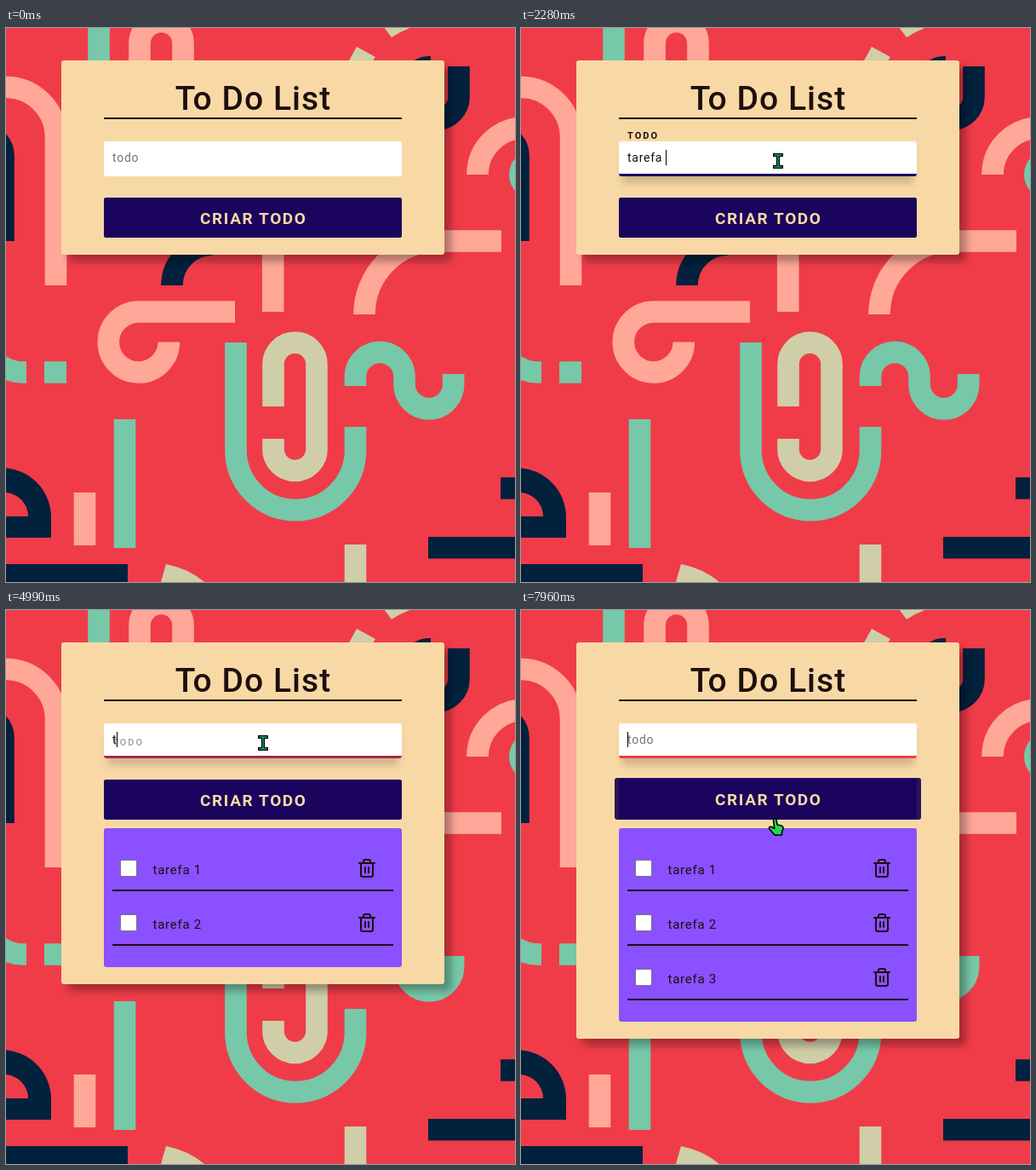
Animation of 598x650 px, one loop 8000 ms. Source, as an HTML page:

```html
<!DOCTYPE html>
<html lang="pt">
<head>
<meta charset="utf-8">
<title>To Do List</title>
<style>
  html, body { margin: 0; width: 100%; height: 100%; overflow: hidden; background: #f03c48; }
  svg { display: block; width: 598px; height: 650px; }
  text { font-family: Roboto, "Open Sans", sans-serif; white-space: pre; fill: #1c0f0e; }
  .title { font-size: 39px; font-weight: 500; letter-spacing: 1px; text-anchor: middle; }
  .field { font-size: 14px; letter-spacing: .75px; }
  .hint { fill: #757575; }
  .label { font-size: 11px; font-weight: 700; letter-spacing: 2px; }
  .action { font-size: 19px; font-weight: 700; letter-spacing: 1.6px; text-anchor: middle; fill: #f8d9a6; }
  .task { font-size: 15px; letter-spacing: .75px; }
  .band { fill: none; stroke-width: 25.6; }
  .salmon { stroke: #ffa798; } .navy { stroke: #02213d; }
  .teal { stroke: #76c8a9; } .beige { stroke: #cfcea9; }
  .icon { fill: none; stroke: #1c0f0e; stroke-width: 2; stroke-linecap: round; stroke-linejoin: round; }
  .pointer { stroke: #000; stroke-width: 1.6; stroke-linejoin: round; }
</style>
</head>
<body>
<svg viewBox="0 0 598 650">
  <defs>
    <filter id="soft" x="-10%" y="-40%" width="120%" height="180%"><feGaussianBlur stdDeviation="5"/></filter>
  </defs>
  <rect width="598" height="650" fill="#f03c48"/>

  <g class="band salmon">
    <path d="M157 45V18A25.5 25.5 0 0 1 208 18V45"/>
    <path d="M554 172A55 55 0 0 1 609 117"/>
    <path d="M421 336A86 86 0 0 1 507 250H582"/>
    <path d="M-58.5 128A58.5 58.5 0 0 1 58.5 128V302"/>
    <path d="M313.7 250V333"/>
    <path d="M269 333H156A35.5 35.5 0 1 0 191.3 368.5"/>
    <path d="M92.5 545V607"/>
  </g>
  <g class="band navy">
    <path d="M532 45V81A26 26 0 0 1 480 81"/>
    <path d="M-55 150A26 26 0 0 1 -3 150V250"/>
    <path d="M195 302A48 48 0 0 1 243 254"/>
    <path d="M581 540H600M496 609.7H600"/>
  </g>
  <g class="band teal">
    <path d="M109 0V45M139.5 459V610M45 404H71"/>
    <path d="M24 404H20Q5 404 -10 394"/>
    <path d="M270 369V498A70.3 70.3 0 0 0 410.5 498V468"/>
    <path d="M410.5 420V407.5A28.8 28.8 0 0 1 468 407.5V418A28.8 28.8 0 0 0 525.7 418V406"/>
  </g>
  <g class="band beige">
    <path d="M314 444V394.5A25.5 25.5 0 0 1 365 394.5V494A25.5 25.5 0 0 1 314 494V482"/>
    <path d="M410.5 606V655"/>
  </g>
  <g fill="#02213d">
    <path d="M-5 516A58 58 0 0 1 53 574V598H0V573H26A28 28 0 0 0 -2 545Z"/>
    <path d="M0 629H143V650H0ZM478 39Q488 32 499 33V39Z"/>
  </g>
  <path fill="#cfcea9" d="M412 22L434 34L430 40H402ZM444 -1L453 11Q466 2 484 -3ZM188 629Q214 634 233 650H182Z"/>
  <circle cx="620" cy="172" r="29" fill="#76c8a9"/>

  <rect id="cardShade" x="73" y="46" width="450" rx="3" opacity=".3" filter="url(#soft)"/>
  <rect id="card" x="65" y="38" width="450" rx="3" fill="#f8d9a6"/>
  <text class="title" x="290.5" y="96">To Do List</text>
  <rect x="115" y="105" width="350" height="2" fill="#1c0f0e"/>

  <rect id="fieldShade" x="119" y="141" width="342" height="41" filter="url(#soft)"/>
  <rect x="115" y="133" width="350" height="41" rx="3" fill="#fff"/>
  <path id="underline" d="M115 171H465Q465 174 462 174H118Q115 174 115 171Z"/>
  <text id="hint" class="field hint" x="125" y="157">todo</text>
  <text id="label" class="label" x="125">TODO</text>
  <text id="typed" class="field" x="125" y="157"></text>
  <rect id="caret" y="143" width="1" height="18"/>

  <rect id="glow" rx="3" fill="#2c1459"/>
  <rect id="button" x="115" width="350" rx="3" fill="#1b045e"/>
  <text id="action" class="action" x="290.8">CRIAR TODO</text>

  <rect id="list" x="115" y="256" width="350" rx="3" fill="#8b50ff"/>
  <g id="items"></g>

  <path id="arrow" class="pointer" fill="#22d655" d="M0 0V17L4 13.5L7 20L10 18.5L7.2 12.5H12Z"/>
  <g id="beam" fill="none">
    <path d="M-6 -7H6M0 -7V7M-6 7H6" stroke="#000" stroke-width="4.2"/>
    <path d="M-4.5 -7H4.5M0 -7V7M-4.5 7H4.5" stroke="#1cab7e" stroke-width="1.5"/>
  </g>
  <path id="hand" class="pointer" fill="#22d655"
    d="M-1.5 1.5Q0 -.5 1.8 1.5L3.2 8L8 9Q10.6 10 10 13L8.5 16V20H0L-6.5 12.5Q-6.5 9.5 -3.5 10.5L-.3 12.5Z"/>
</svg>

<script>
const LOOP = 8000, FADE = 300, BLINK = 530;
const RED = [240, 60, 72], NAVY = [27, 4, 94];

// Bursts of screen updates: first time, last time, number of updates.
const BURSTS = [
  [210, 290, 2], [500, 660, 3], [890, 1200, 5], [1350, 1660, 5], [1810, 1900, 2],
  [2280, 2360, 2], [2670, 2900, 4], [3130, 3510, 6], [3680, 3750, 2], [4150, 4230, 2],
  [4530, 4760, 4], [4990, 5380, 6], [5530, 5610, 2], [6160, 6230, 2], [6400, 6400, 1],
  [6720, 7020, 5], [7250, 7250, 1], [7800, 7960, 3]
];
const TICKS = BURSTS.flatMap(([a, b, n]) =>
  Array.from({ length: n }, (_, i) => a + (n > 1 ? (b - a) * i / (n - 1) : 0)));

const FOCUS = 872;
const TASKS = [
  { text: "tarefa 1", keys: [1335, 1420, 1570, 1650, 1810, 1890, 2280, 2350], sent: 2620 },
  { text: "tarefa 2", keys: [3108, 3200, 3350, 3500, 3680, 3750, 4150, 4230], sent: 4480 },
  { text: "tarefa 3", keys: [4922, 5060, 5220, 5370, 5530, 5610, 6230, 6400], sent: 6687 }
];
const ACTIONS = [FOCUS, ...TASKS.flatMap(k => [...k.keys, k.sent])];

// Pointer stops: time, shape, x, y.
const POINTER = [
  [210, "arrow", 357, 276], [290, "beam", 337, 148], [500, "beam", 325, 150],
  [580, "beam", 310, 154], [660, "beam", 302, 156],
  [7800, "hand", 301, 212], [7880, "hand", 300, 232], [7960, "hand", 298, 244]
];

const el = {};
document.querySelectorAll("[id]").forEach(node => el[node.id] = node);

const set = (node, attrs) => {
  for (const name in attrs) node.setAttribute(name, attrs[name]);
};
const show = (node, on) => set(node, { visibility: on ? "visible" : "hidden" });
const lastBefore = (times, t) => times.filter(x => x <= t).pop();
const mix = (a, b, p) => `rgb(${a.map((v, i) => Math.round(v + (b[i] - v) * p))})`;

// The CSS "ease" curve.
function ease(x) {
  if (x <= 0) return 0;
  if (x >= 1) return 1;
  const bez = (a, b, s) => 3 * a * s * (1 - s) ** 2 + 3 * b * s * s * (1 - s) + s ** 3;
  let lo = 0, hi = 1;
  for (let i = 0; i < 20; i++) {
    const mid = (lo + hi) / 2;
    if (bez(.25, .25, mid) < x) lo = mid; else hi = mid;
  }
  return bez(.1, 1, lo);
}

el.items.innerHTML = TASKS.map(({ text }, i) => `
  <g transform="translate(0 ${64 * i})">
    <rect x="134.5" y="293.5" width="19" height="19" rx="2" fill="#fff" stroke="#767676"/>
    <text class="task" x="172.5" y="310">${text}</text>
    <path class="icon" transform="translate(412 291)" d="M3 6H21M19 6V20a2 2 0 0 1-2 2H7a2 2 0 0 1-2-2V6m3 0V4a2 2 0 0 1 2-2h4a2 2 0 0 1 2 2v2M10 11v6M14 11v6"/>
    <rect x="125" y="328" width="330" height="2" fill="#1c0f0e"/>
  </g>`).join("");

function drawField(t) {
  const focus = ease((t - FOCUS) / FADE);
  const task = TASKS.filter(k => k.keys[0] <= t).pop();
  const typing = task && t < task.sent;
  const count = typing ? task.keys.filter(k => k <= t).length : 0;

  let filled = 0;
  if (task) filled = typing ? ease((t - task.keys[0]) / FADE) : 1 - ease((t - task.sent) / FADE);

  el.typed.textContent = typing ? task.text.slice(0, count) : "";
  show(el.hint, !typing);
  set(el.label, { y: 130 + 45 * (1 - filled), opacity: filled });
  set(el.underline, { fill: mix(RED, NAVY, filled), opacity: focus });
  set(el.fieldShade, { opacity: .17 * focus });

  const last = lastBefore(ACTIONS, t);
  show(el.caret, last !== undefined && Math.floor((t - last) / BLINK) % 2 === 0);
  set(el.caret, { x: 125 + (count ? Math.round(el.typed.getComputedTextLength()) : 0) });
}

function drawCard(t) {
  const n = TASKS.filter(k => k.sent <= t).length;
  const height = n ? 273 + 64 * n : 228;
  set(el.card, { height });
  set(el.cardShade, { height });
  set(el.list, { height: n ? 35 + 64 * n : 0 });
  [...el.items.children].forEach((item, i) => show(item, i < n));
}

function drawButton(t) {
  const p = ease((t - 7770) / 190);
  set(el.glow, { x: 115 - 5 * p, y: 199 - 2 * p, width: 350 + 10 * p, height: 47 + 2 * p });
  set(el.button, { y: 199 - p, height: 47 + p });
  set(el.action, { y: 229.5 - p });
}

function drawPointer(t) {
  const stop = POINTER.filter(p => p[0] <= t).pop();
  for (const name of ["arrow", "beam", "hand"]) show(el[name], stop && stop[1] === name);
  if (stop) set(el[stop[1]], { transform: `translate(${stop[2]} ${stop[3]})` });
}

function render(now) {
  const t = lastBefore(TICKS, now % LOOP) || 0;
  drawCard(t);
  drawField(t);
  drawButton(t);
  drawPointer(t);
}

function frame() {
  render(performance.now());
  requestAnimationFrame(frame);
}
frame();
</script>
</body>
</html>
```
